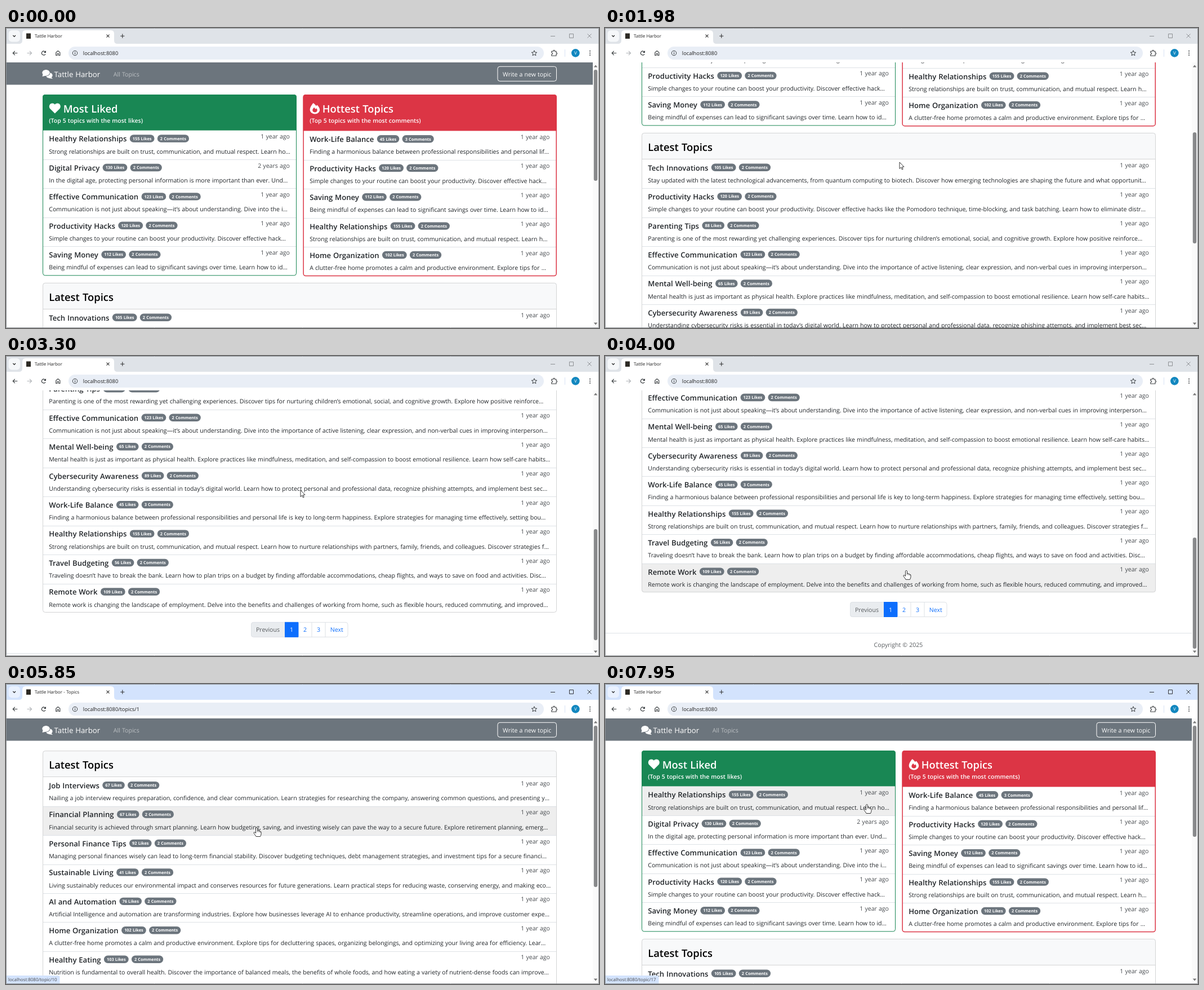
Animation of 1053x532 px, one loop 8 s. Source, as an HTML page with a canvas:

```html
<!DOCTYPE html>
<html lang="en">
<head>
<meta charset="utf-8">
<title>Tattle Harbor</title>
<style>
  html, body { margin: 0; width: 100%; height: 100%; overflow: hidden; background: #fff; }
  canvas { display: block; width: 100vw; height: 100vh; }
</style>
</head>
<body>
<canvas id="stage" width="1053" height="532"></canvas>
<script>
const g = document.getElementById('stage').getContext('2d');
const LOOP = 8000, W = 1053, H = 532;
const ROW = 51.44, TOP = 61;
const BRAND = 'Tattle Harbor', HOST = 'localhost:8080';
const INK = '#212529', MUTED = '#585c5f', DATE = '#474b4f', GREY = '#6c757d', LINE = '#dee2e6', EDGE = '#d3d4d5';
const GREEN = '#198754', RED = '#dc3545', BLUE = '#0d6efd';

// name: [likes, comments, text]
const TOPICS = {
  'Tech Innovations': [105, 2, 'Stay updated with the latest technological advancements, from quantum computing to biotech. Discover how emerging technologies are shaping the future and what opportunit'],
  'Productivity Hacks': [120, 2, 'Simple changes to your routine can boost your productivity. Discover effective hacks like the Pomodoro technique, time-blocking, and task batching. Learn how to eliminate distr'],
  'Parenting Tips': [88, 2, 'Parenting is one of the most rewarding yet challenging experiences. Discover tips for nurturing children’s emotional, social, and cognitive growth. Explore how positive reinforce'],
  'Effective Communication': [123, 2, 'Communication is not just about speaking—it’s about understanding. Dive into the importance of active listening, clear expression, and non-verbal cues in improving interperson'],
  'Mental Well-being': [65, 2, 'Mental health is just as important as physical health. Explore practices like mindfulness, meditation, and self-compassion to boost emotional resilience. Learn how self-care habits'],
  'Cybersecurity Awareness': [89, 2, 'Understanding cybersecurity risks is essential in today’s digital world. Learn how to protect personal and professional data, recognize phishing attempts, and implement best sec'],
  'Work-Life Balance': [45, 3, 'Finding a harmonious balance between professional responsibilities and personal life is key to long-term happiness. Explore strategies for managing time effectively, setting bou'],
  'Healthy Relationships': [155, 2, 'Strong relationships are built on trust, communication, and mutual respect. Learn how to nurture relationships with partners, family, friends, and colleagues. Discover strategies f'],
  'Travel Budgeting': [56, 2, 'Traveling doesn’t have to break the bank. Learn how to plan trips on a budget by finding affordable accommodations, cheap flights, and ways to save on food and activities. Disc'],
  'Remote Work': [109, 2, 'Remote work is changing the landscape of employment. Delve into the benefits and challenges of working from home, such as flexible hours, reduced commuting, and improved'],
  'Job Interviews': [67, 2, 'Nailing a job interview requires preparation, confidence, and clear communication. Learn strategies for researching the company, answering common questions, and presenting y'],
  'Financial Planning': [67, 2, 'Financial security is achieved through smart planning. Learn how budgeting, saving, and investing wisely can pave the way to a secure future. Explore retirement planning, emerg'],
  'Personal Finance Tips': [92, 2, 'Managing personal finances wisely can lead to long-term financial stability. Discover budgeting techniques, debt management strategies, and investment tips for a secure financi'],
  'Sustainable Living': [41, 2, 'Living sustainably reduces our environmental impact and conserves resources for future generations. Learn practical steps for reducing waste, conserving energy, and making eco'],
  'AI and Automation': [76, 2, 'Artificial Intelligence and automation are transforming industries. Explore how businesses leverage AI to enhance productivity, streamline operations, and improve customer expe'],
  'Home Organization': [102, 2, 'A clutter-free home promotes a calm and productive environment. Explore tips for decluttering spaces, organizing belongings, and optimizing your living area for efficiency. Lear'],
  'Healthy Eating': [103, 2, 'Nutrition is fundamental to overall health. Discover the importance of balanced meals, the benefits of whole foods, and how eating a variety of nutrient-dense foods can improve'],
  'Digital Privacy': [130, 2, 'In the digital age, protecting personal information is more important than ever. Und'],
  'Saving Money': [112, 2, 'Being mindful of expenses can lead to significant savings over time. Learn how to id']
};
const NAMES = Object.keys(TOPICS);
const PAGES = [NAMES.slice(0, 10), NAMES.slice(10, 17)];
// name and where its line is cut
const LIKED = [['Healthy Relationships', 'Learn ho'], ['Digital Privacy', 'Und'],
  ['Effective Communication', 'into the i'], ['Productivity Hacks', 'effective hack'], ['Saving Money', 'to id']];
const HOT = [['Work-Life Balance', 'personal lif'], ['Productivity Hacks', 'effective hack'],
  ['Saving Money', 'to id'], ['Healthy Relationships', 'Learn h'], ['Home Organization', 'tips for ']];

// [start, end, steps, target]
const SCROLLS = [[1050, 1350, 5, 140.9], [1830, 2060, 4, 281.8], [2440, 2670, 4, 422.8], [3070, 3450, 6, 594]];
// [start, end, steps, [x, y, progress]...]
const MOVES = [
  [70, 820, 11, [592, 545, 0], [572, 420, .35], [548, 290, .7], [523, 238, 1]],
  [3850, 4630, 11, [523, 238, 0], [535, 380, .273], [531, 446, .64], [531, 446, 1]],
  [4700, 4920, 4, [531, 446, 0], [541, 324, 1]],
  [5780, 6560, 11, [541, 324, 0], [330, 170, .4], [214, 80, .8], [214, 80, 1]],
  [6630, 7410, 11, [214, 80, 0], [349, 161, .273], [362, 170, .4], [137, 84, .9], [137, 84, 1]],
  [7490, 7490, 1, [137, 84, 0], [132, 76, 1]],
  [7640, 7950, 5, [132, 76, 0], [465, 213, 1]]
];

let mouse, link;

const lerp = (a, b, p) => a + (b - a) * p;
const POWER = 2.15;
const ease = p => p < .5 ? (2 * p) ** POWER / 2 : 1 - (2 - 2 * p) ** POWER / 2;

function progress(t, [start, end, n]) {
  if (t < start) return 0;
  const step = (end - start) / (n - 1) || 1;
  return Math.min(1, (Math.floor((t - start + 10) / step) + 1) / n);
}

function scrollAt(t) {
  let y = 0;
  for (const s of SCROLLS) y = lerp(y, s[3], ease(progress(t, s)));
  return y;
}

function mouseAt(t) {
  const move = MOVES.filter(m => t >= m[0]).pop();
  if (!move) return null;
  const p = progress(t, move), keys = move.slice(3);
  const i = Math.max(1, keys.findIndex(k => k[2] >= p));
  const [a, b] = [keys[i - 1], keys[i]], q = (p - a[2]) / (b[2] - a[2]);
  const hovers = t < 1050 || t >= 3850;
  return { x: lerp(a[0], b[0], q), y: lerp(a[1], b[1], q), hovers };
}

function hit(x, y, w, h, url) {
  const m = mouse;
  const over = m && m.hovers && m.y > TOP && m.x >= x && m.x < x + w && m.y >= y && m.y < y + h;
  if (over) link = url;
  return over;
}

function font(size, weight = 400) {
  g.font = `${weight} ${size * (weight > 400 ? .93 : .939)}px "Open Sans", "Noto Sans", sans-serif`;
  g.wordSpacing = `${size * .03}px`;
}
function text(s, x, y, size, color = INK, weight = 400, align = 'left') {
  font(size, weight);
  g.fillStyle = color;
  g.textAlign = align;
  g.fillText(s, x, Math.round(y));
  return g.measureText(s).width;
}
function rect(x, y, w, h, color) { g.fillStyle = color; g.fillRect(x, y, w, h); }
function rounded(x, y, w, h, r) { g.beginPath(); g.roundRect(x, y, w, h, r); }
function pill(x, y, w, h, r, color) { rounded(x, y, w, h, r); g.fillStyle = color; g.fill(); }
function outline(color, width = 1) { g.strokeStyle = color; g.lineWidth = width; g.stroke(); }
function shape(d, x, y, fill, stroke, width = 1) {
  const p = new Path2D(d);
  g.save();
  g.translate(x, y);
  if (fill) { g.fillStyle = fill; g.fill(p); }
  if (stroke) { g.strokeStyle = stroke; g.lineWidth = width; g.stroke(p); }
  g.restore();
}
function disc(x, y, rx, ry, color) { g.beginPath(); g.ellipse(x, y, rx, ry, 0, 0, 7); g.fillStyle = color; g.fill(); }

function badge(label, x, y) {
  font(7.92, 700);
  const w = g.measureText(label).width + 10.2;
  pill(x, y - 6.7, w, 13.4, 6.7, GREY);
  text(label, x + 5.1, y + 2.7, 7.92, '#fff', 700);
  return x + w;
}

function row(name, cut, x, y, w, id, first) {
  if (y > H || y + ROW < TOP) return;
  const [likes, comments, full] = TOPICS[name];
  const body = cut ? full.slice(0, full.indexOf(cut) + cut.length) : full;
  if (hit(x, y, w, ROW, `/topic/${id}`)) rect(x, y, w, ROW, '#eee');
  if (!first) rect(x, Math.round(y), w, 1, LINE);
  const left = x + 11.3;
  let end = left + text(name, left, y + 19.8, 14.09, INK, 600);
  end = badge(`${likes} Likes`, end + 5.4, y + 14.4);
  badge(`${comments} Comments`, end + 5.2, y + 14.4);
  const age = name === 'Digital Privacy' ? '2 years ago' : '1 year ago';
  text(age, x + w - 12, y + 14.5, 11.27, DATE, 400, 'right');
  text(body + '…', left, y + 41, 11.27);
}

function card(x, y, w, h, head, headFill, edge, width, content) {
  g.save();
  rounded(x, y, w, h, 4.3);
  g.clip();
  rect(x, y, w, h, '#fff');
  rect(x, y, w, head, headFill);
  content(y + head);
  g.restore();
  rounded(x + width / 2, y + width / 2, w - width, h - width, 4);
  outline(edge, width);
}

function topCard(items, x, y, w, width, head, color, title, note, icon, indent) {
  card(x, y, w, head + 5 * ROW + width / 2, head, color, color, width, top => {
    const left = x + 11.3 + (width - 1);
    icon(left + .5, y + 15);
    text(title, left + indent, y + 31.6, 19.72, '#fff', 600);
    text(note, left, y + 49.8, 11.27, '#fff', 600);
    const inset = width - 1;
    items.forEach(([name, cut], i) => row(name, cut, x + inset, top + i * ROW, w - 2 * inset, 17 - i, !i));
  });
}

function latestCard(names, y, firstId) {
  card(65, y, 913, 47 + 10 * ROW, 47, '#f8f9fa', EDGE, 1, top => {
    text('Latest Topics', 76.2, y + 32, 19.72, '#000', 600);
    rect(65, Math.round(top) - 1, 913, 1, EDGE);
    names.forEach((name, i) => row(name, '', 65, top + i * ROW, 913, firstId - i, !i));
  });
}

function heart(x, y) {
  shape('M10 18L1.6 9.8C-.8 7.2-.4 2.8 2.6.8C5-.8 8.2-.2 10 2.2C11.8-.2 15-.8 17.4.8C20.4 2.8 20.8 7.2 18.4 9.8Z', x, y + .5, '#fff');
}
function flame(x, y) {
  shape('M6 0C8 1.5 9.8 3.4 11 5.2L12.8 3.4C15.5 6 17.5 9.5 17.5 12C17.5 16 13.5 19.5 8.8 19.5C3.8 19.5 0 16 0 11.8C0 8.2 3 3.2 6 0Z', x, y, '#fff');
  shape('M8.9 16.5C6.3 16.5 4.6 15 4.6 12.7C4.6 11 6 9.5 7.4 7.7L10 11L11.5 9.2C12.6 10.7 13 11.8 13 12.8C13 15 11.3 16.5 8.9 16.5Z', x, y, RED);
}

function navbar(y) {
  rect(1, y, 1041, 39.6, GREY);
  disc(76.8, y + 23, 5.8, 4.8, '#fff');
  shape('M79 25L83 29L76 28Z', 0, y, '#fff');
  disc(71, y + 18.3, 7.5, 6.2, GREY);
  disc(71, y + 18.3, 6.7, 5.4, '#fff');
  shape('M66 19L64.5 25L71 23.4Z', 0, y, '#fff');
  hit(64, y + 8, 110, 25, '');
  text(BRAND, 85.6, y + 25.6, 14.09, '#fff');
  const over = hit(185, y + 9, 59, 23, '/topics');
  text('All Topics', 190.8, y + 24.6, 11.27, `rgba(255,255,255,${over ? .75 : .55})`);
  rounded(873, y + 7.3, 104.5, 26, 4);
  outline('#fff');
  text('Write a new topic', 925.2, y + 24.6, 11.27, '#fff', 400, 'center');
}

function pager(y) {
  const cells = [['Previous', 435, 60], ['1', 495, 24], ['2', 519, 24], ['3', 543, 24], ['Next', 567, 40.5]];
  g.save();
  rounded(435, y, 172.5, 27, 4.3);
  g.clip();
  cells.forEach(([label, x, w], i) => {
    const over = i === 2 && hit(x, y, w, 27, '/topics/1');
    rect(x, y, w, 27, i === 1 ? BLUE : i === 0 || over ? '#e9ecef' : '#fff');
    if (i > 1) rect(x - .5, y, 1, 27, i === 2 ? BLUE : LINE);
    const color = i === 0 ? MUTED : i === 1 ? '#fff' : over ? '#0a58ca' : BLUE;
    text(label, x + w / 2, y + 17.6, 11.27, color, 400, 'center');
  });
  g.restore();
  rounded(435.5, y + .5, 171.5, 26, 4);
  outline(LINE);
  rect(495, y, 24, 27, BLUE);
  text('1', 507, y + 17.6, 11.27, '#fff', 400, 'center');
}

function home(scroll) {
  const at = y => y - scroll;
  navbar(at(TOP));
  topCard(LIKED, 65, at(118), 451, 1, 63.6, GREEN, 'Most Liked', '(Top 5 topics with the most likes)', heart, 25.4);
  topCard(HOT, 527.4, at(118), 450.6, 1.5, 64.4, RED, 'Hottest Topics', '(Top 5 topics with the most comments)', flame, 22.6);
  latestCard(PAGES[0], at(451.8), 24);
  pager(at(1030));
  rect(1, Math.round(at(1085)), 1041, 1, LINE);
  text('Copyright © 2025', 521, at(1109.6), 11.27, MUTED, 400, 'center');
}

function topics(page) {
  navbar(TOP);
  latestCard(PAGES[page], 118.2, page ? 11 : 24);
}

function scrollbar(y, h) {
  rect(1042, TOP, 10, 470, '#fafafa');
  pill(1043.8, y, 6.4, h, 3.2, '#88898b');
  shape('M0 0L3.2-4L6.4 0Z', 1043.8, 69.5, '#777');
  shape('M0 0L3.2 4L6.4 0Z', 1043.8, 522.5, '#777');
}

function chrome(active, url, title) {
  rect(0, 0, W, 29, active ? '#d3e3fd' : '#dfe3e8');
  rect(0, 28, W, 33, '#fff');
  pill(4.5, 4, 20.5, 20.5, 6, active ? '#e9f1fe' : '#f5f7f9');
  shape('M-2.3-1.2L0 1.2L2.3-1.2', 14.7, 14.2, null, '#222', 1.2);
  shape('M23 28Q29 28 29 22V10Q29 4 35 4H186Q192 4 192 10V22Q192 28 198 28Z', 0, 0, '#fff');
  rect(36, 9.5, 8, 9.5, '#2d2a24');
  text(title, 51, 17.4, 8.45, '#1f1f1f');
  shape('M-2.5-2.5L2.5 2.5M2.5-2.5L-2.5 2.5', 181, 14.2, null, '#333', 1.1);
  shape('M-3.6 0H3.6M0-3.6V3.6', 206.8, 14.2, null, '#333', 1.1);
  const tool = active ? '#222' : '#85888c';
  shape('M967 14.5H975M1000.5 10.5H1007.5V17.5H1000.5ZM1032.5 10.5L1039.5 17.5M1039.5 10.5L1032.5 17.5', 0, 0, null, tool, .9);

  const ink = '#3c4043';
  const arrow = 'M4 0H-3.8M-.4-3.6L-4 0L-.4 3.6';
  shape(arrow, 16.3, 44.5, null, ink, 1.2);
  g.save();
  g.translate(41.5, 44.5);
  g.scale(-1, 1);
  shape(arrow, 0, 0, null, '#b0b3b7', 1.2);
  g.restore();
  g.beginPath();
  g.arc(67, 44.5, 3.5, .5, 5.5);
  outline(ink, 1.2);
  shape('M71-4.6V-.4H66.8Z', 0, 44.5, ink);
  shape('M-3.6 4V-1L0-4L3.6-1V4H1.2V.8H-1.2V4Z', 92.3, 44.5, null, ink, 1.1);
  pill(111, 33, 844, 23, 11.5, '#e9eef6');
  g.beginPath();
  g.arc(122.5, 44.5, 4.2, 0, 7);
  outline(ink, 1);
  rect(122, 43.7, 1.1, 3, ink);
  rect(122, 42, 1.1, 1, ink);
  text(url, 136.8, 47.8, 9.86, '#1f1f1f');
  g.beginPath();
  for (let i = 0; i < 10; i++) {
    const r = i % 2 ? 2.2 : 5, a = i * Math.PI / 5 - Math.PI / 2;
    g.lineTo(938 + r * Math.cos(a), 44.8 + r * Math.sin(a));
  }
  g.closePath();
  outline(ink, 1);
  shape('M-4.2-3H-1.2C-1.6-5.6 1.8-5.6 1.4-3H4V-.4C6-.6 6 2.4 4 2.2V5H-4.2V2.4C-1.8 2.2-1.8-.6-4.2-.6Z', 973, 44.3, null, ink, 1.1);
  rect(992, 38, 1, 13, '#d9e4f5');
  disc(1011.3, 44.4, 7.3, 7.3, '#1287bf');
  text('V', 1011.3, 47.4, 8.4, '#fff', 400, 'center');
  for (const y of [40.8, 44.4, 48]) disc(1037, y, 1, 1, ink);
}

function statusBubble(label) {
  font(8.45);
  const w = g.measureText(label).width + 8;
  pill(1, 517, w, 14, [0, 3, 0, 0], '#d3e3fd');
  text(label, 4, 527, 8.45, '#474747');
}

function pointer(hand) {
  const d = hand
    ? 'M-1.5 1.5Q0-.8 1.5 1.5V6L3 5.6Q4 5.6 4.2 6.8Q6 6 6.4 7.6Q8 7.2 8 9V12Q7.8 14 6.5 16.5H-1Q-2.5 13.5-5 10.5Q-5.5 8.5-3.2 8.8L-1.5 10.5Z'
    : 'M0 0V11.5L2.7 9L4.4 13L6.2 12.2L4.5 8.4L8 8.2Z';
  shape(d, mouse.x, mouse.y, '#fff', '#222', .9);
  if (hand) shape('M1.5 6V8.5M4.2 6.8V9M6.4 7.6V9.4', mouse.x, mouse.y, null, '#222', .7);
}

function draw(t) {
  const active = t >= 4480;
  const page = t < 4700 || t >= 7640 ? -1 : t < 6630 ? 1 : 0;
  const scroll = t < 4700 ? scrollAt(t) : 0;
  mouse = mouseAt(t);
  link = null;
  g.textRendering = 'geometricPrecision';

  rect(0, 0, W, H, '#fff');
  g.save();
  g.beginPath();
  g.rect(0, TOP, W, 471);
  g.clip();
  if (page < 0) home(scroll); else topics(page);
  if (page < 0) scrollbar(74 + scroll * .4175, 197); else scrollbar(74, 286);
  g.restore();

  chrome(active, page < 0 ? HOST : `${HOST}/topics/${page}`, page < 0 ? BRAND : `${BRAND} - Topics`);
  let status = link;
  if (status === null && t >= 6630 && t < 7000) status = '/topics';
  if (status === null && t >= 7640 && t < 7850) status = '';
  if (active && status !== null) statusBubble(HOST + status);
  g.beginPath();
  g.rect(.5, .5, W - 1, H - 1);
  outline('#8f9296');
  if (mouse) pointer(link !== null);
}

const begin = performance.now();
function tick() {
  draw((performance.now() - begin) % LOOP);
  requestAnimationFrame(tick);
}
tick();
</script>
</body>
</html>
```
